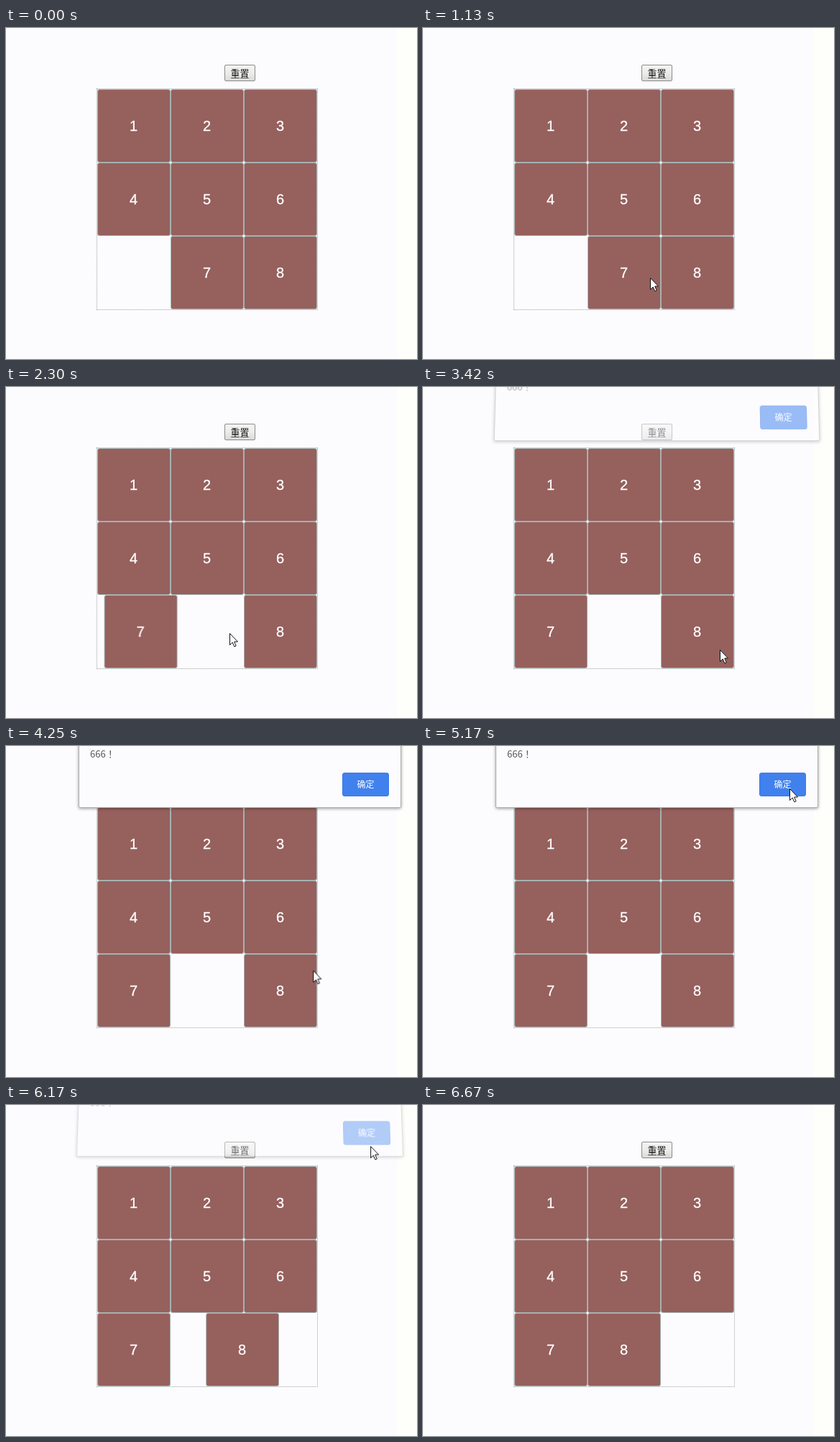
These frames come from a looping animation (572x460 px, 8.92 s). An HTML page:

```html
<!DOCTYPE html>
<html lang="zh">
<head>
<meta charset="utf-8">
<title>Sliding puzzle</title>
<style>
  html, body { margin: 0; width: 100%; height: 100%; overflow: hidden; }
  body { position: relative; font-family: "Noto Sans CJK JP", "Noto Sans CJK SC", "Noto Sans CJK", sans-serif; }
  div, svg { position: absolute; box-sizing: border-box; }
  #stage { left: 0; top: 0; width: 572px; height: 460px; overflow: hidden; background: #fcfcff; }
  #strip { left: 544px; top: 0; width: 28px; height: 460px; background: #fefefb; }
  #reset {
    left: 304px; top: 51px; width: 43px; height: 23px;
    border: 1px solid #8c8c8c; border-radius: 2px;
    background: linear-gradient(#f4f4f2, #ececea 50%, #dadad8);
    font-size: 13px; line-height: 21px; text-align: center; color: #1a1a1a;
  }
  #board { left: 126px; top: 84px; width: 308px; height: 308px; border: 1px dotted #a2a2a2; background: #fcfcff; }
  .tile {
    width: 102px; height: 102px; border: 1px solid #a5b2b0; border-radius: 3px;
    padding-right: 1px; background: #96605d;
    font: 20px/100px "Liberation Sans", Arial, sans-serif; text-align: center;
    color: #fff; -webkit-text-stroke: .3px #fff;
  }
  #dialog {
    left: 101px; top: -60px; width: 449px; height: 146px; opacity: 0;
    border: 1px solid #b0b0b0; border-radius: 2px; background: #fcfcff;
    box-shadow: 0 1px 4px rgba(0, 0, 0, .4); transform-origin: 50% 60px;
  }
  #msg { left: 15px; top: 60px; font-size: 13px; line-height: 20px; white-space: nowrap; color: #555; }
  #ok {
    left: 366px; top: 96px; width: 65px; height: 33px; border-radius: 3px;
    border: 1px solid #3b78e7; background: #4081ee;
    font-size: 12px; line-height: 30px; text-align: center; color: #fff;
  }
  #cursor { left: -1px; top: 0; width: 13px; height: 21px; overflow: visible; }
</style>
</head>
<body>
<div id="stage">
  <div id="strip"></div>
  <div id="reset">重置</div>
  <div id="board"></div>
  <div id="dialog"><div id="msg">666！</div><div id="ok">确定</div></div>
  <svg id="cursor" viewBox="0 0 13 21">
    <path d="M.5 .5V16.5L4.2 13L6.8 18.8L9.2 17.8L6.7 12H11.5Z" fill="#fff" stroke="#111"/>
  </svg>
</div>
<script>
const LOOP = 8920, CELL = 102;
const ENTER = 590, OPEN = 3415, CLOSE = 6050, LEAVE = 6660;
const $ = id => document.getElementById(id);

// steps: [time in ms, style, easing to the next step]
function play(el, steps) {
  const first = steps[0][1], last = steps[steps.length - 1][1];
  const frames = [[0, first], ...steps, [LOOP, last]].map(([t, style, easing = 'linear']) =>
    ({ offset: t / LOOP, easing, ...style }));
  el.animate(frames, { duration: LOOP, iterations: Infinity });
}

const at = (x, y, opacity = 1) => ({ transform: `translate(${x}px, ${y}px)`, opacity });

// Tiles 1-6 fill the upper rows; 7 and 8 start one cell to the right.
for (let n = 1; n <= 8; n++) {
  const cell = n < 7 ? n - 1 : n;
  const tile = document.createElement('div');
  tile.className = 'tile';
  tile.textContent = n;
  tile.style.left = cell % 3 * CELL + 'px';
  tile.style.top = Math.floor(cell / 3) * CELL + 'px';
  $('board').append(tile);
  if (n > 6) {
    const start = n === 7 ? 2048 : CLOSE;
    play(tile, [[start, at(0, 0), 'ease'], [start + 400, at(-CELL, 0)]]);
  }
}

// The dialog swings in from above: k = 0 is flat, k = 2 is gone.
const tilt = k => ({
  transform: `perspective(800px) translateY(${-12 * k}px) rotateX(${6 * k}deg)`,
  opacity: 1 - k / 2
});
play($('dialog'), [
  [OPEN, tilt(2), 'step-end'],
  [OPEN, tilt(1), 'ease-out'],
  [OPEN + 165, tilt(0)],
  [CLOSE, tilt(0)],
  [CLOSE + 200, tilt(2)]
]);

// Pointer: in from the right, to tile 7, tile 8, the dialog button, and out.
play($('cursor'), [
  [ENTER, at(514, 397, 0), 'step-end'],
  [ENTER, at(514, 397)],
  [1130, at(317, 347), 'ease-out'],
  [1500, at(312, 342)],
  [2400, at(312, 342)],
  [3050, at(414, 365)],
  [3600, at(414, 365)],
  [4420, at(432, 298)],
  [4950, at(560, 72), 'ease-out'],
  [5170, at(511, 59)],
  [6170, at(508, 57)],
  [LEAVE, at(560, 60), 'step-end'],
  [LEAVE, at(560, 60, 0)]
]);
</script>
</body>
</html>
```
